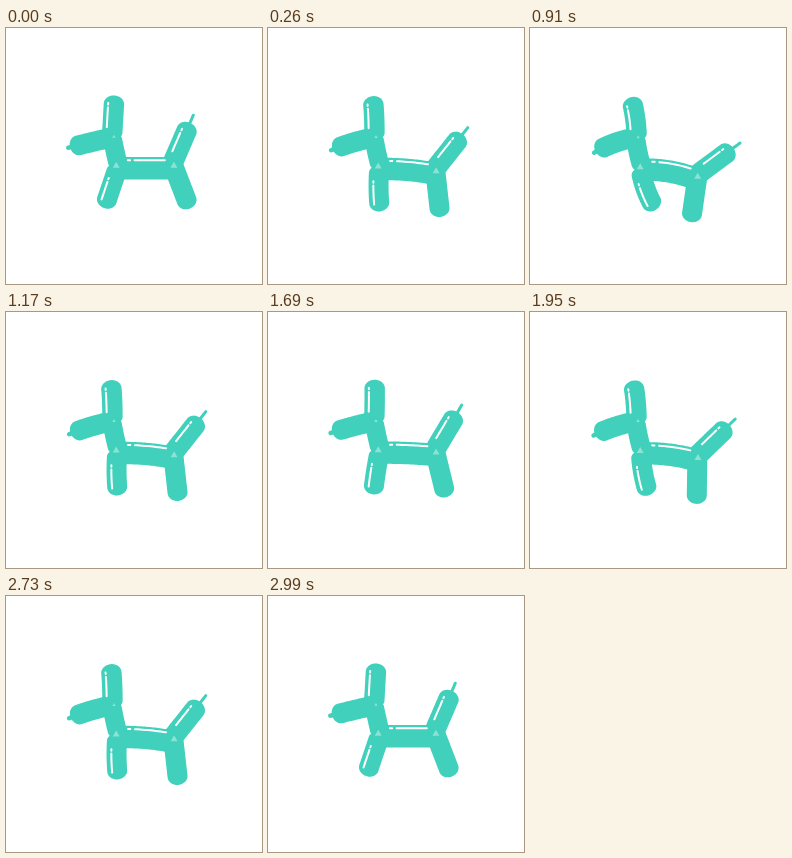
An HTML page with a canvas for the animation above (3120 ms loop, 256 px wide and 256 px high).

```html
<!DOCTYPE html>
<html lang="en">
<head>
<meta charset="utf-8">
<title>Balloon dog</title>
<style>
html, body { margin: 0; width: 100%; height: 100%; overflow: hidden; background: #fff; }
canvas { display: block; width: 256px; height: 256px; }
</style>
</head>
<body>
<canvas id="stage" width="256" height="256"></canvas>
<script>
const ctx = document.getElementById('stage').getContext('2d');
const TEAL = '#40d0bb', PALE = '#8ce3d5', STEP = 130, RAD = Math.PI / 180;

// Where the balloons are twisted together, and how far each twist drifts while bucking.
const joints = {
  head: { x: 106, y: 109.3, dx: 0.5, dy: 1.7 },
  shoulder: { x: 111.5, y: 140.3, dx: 0, dy: 3 },
  hip: { x: 166.5, y: 135.5, dx: 1.5, dy: 13.5 }
};

// A limb leaves its joint at `angle`, swings by `swing` and curls by `bend` degrees.
// `tuck` is the hidden part behind the joint; `shine` runs from a to b along the limb.
const limbs = {
  snout: { joint: 'head', angle: 166.6, swing: -5.6, bend: -30, reach: 43.2, tuck: 7, r: 10 },
  ear: { joint: 'head', angle: -86.7, swing: -13.8, bend: -20, reach: 41.9, tuck: 2, r: 10.2,
    shine: { side: 5.8, a: 0.82, b: 0.27 } },
  neck: { joint: 'head', angle: 77.5, swing: 0.5, bend: -18, reach: 33, tuck: 4, r: 9.5 },
  body: { joint: 'shoulder', angle: 0, swing: 12, bend: 34, reach: 60.3, tuck: 4.5, r: 11.2,
    shine: { side: 8, a: 0.23, b: 0.8 } },
  tail: { joint: 'hip', angle: -66.7, swing: 37.8, bend: 0, reach: 44.3, tuck: 4.5, r: 10.3,
    shine: { side: 5, a: 0.82, b: 0.32 } },
  hindLeg: { joint: 'hip', angle: 69, swing: 36.5, bend: 0, reach: 48.3, tuck: 1.5, r: 10 },
  frontLeg: { joint: 'shoulder', angle: 108.6, swing: -48.4, bend: -30, reach: 42, tuck: 3.5, r: 10,
    shine: { side: -5.2, a: 0.34, b: 0.84 } }
};

// Places a limb for buck amount k; returns its length and a point finder along its arc.
function pose(limb, k) {
  const { x, y, dx, dy } = joints[limb.joint];
  const angle = (limb.angle + limb.swing * k) * RAD, bend = limb.bend * k * RAD;
  const length = limb.reach + limb.tuck;
  const x0 = x + dx * k - limb.tuck * Math.cos(angle);
  const y0 = y + dy * k - limb.tuck * Math.sin(angle);
  const at = (s, side = 0) => {
    const half = bend * s / 2, chord = s * length * (half ? Math.sin(half) / half : 1);
    const toward = angle + half - bend / 2, heading = toward + half;
    return [x0 + chord * Math.cos(toward) + side * Math.sin(heading),
            y0 + chord * Math.sin(toward) - side * Math.cos(heading)];
  };
  return { length, at };
}

const cap = (d, size) => d < size ? Math.sqrt(1 - (1 - d / size) ** 2) : 1;

function fillShape(points, color) {
  ctx.fillStyle = color;
  ctx.beginPath();
  for (const p of points) ctx.lineTo(...p);
  ctx.fill();
}

function drawLimb({ length, at }, r) {
  const n = 60, left = [], right = [];
  for (let i = 0; i <= n; i++) {
    const s = (1 - Math.cos(Math.PI * i / n)) / 2;
    const w = r * cap(s * length, 7) * cap((1 - s) * length, 8.5);
    left.push(at(s, w));
    right.unshift(at(s, -w));
  }
  fillShape(left.concat(right), TEAL);
}

function drawLine({ at }, from, to, side, color, width) {
  ctx.strokeStyle = color;
  ctx.lineWidth = width;
  ctx.beginPath();
  for (let i = 0; i <= 12; i++) ctx.lineTo(...at(from + (to - from) * i / 12, side));
  ctx.stroke();
}

function drawShine(posed, { side, a, b }) {
  const span = b - a;
  drawLine(posed, a, a + span * 0.06, side, '#fff', 2);
  drawLine(posed, a + span * 0.18, b, side, '#fff', 2);
}

function drawKnot([x, y], r) {
  fillShape([-90, 30, 150].map(d => [x + r * Math.cos(d * RAD), y + r * Math.sin(d * RAD)]), PALE);
}

function draw(time) {
  const step = Math.floor(time / STEP) % 12;
  const k = Math.min(step, 11 - step) / 5;
  const posed = {};
  for (const name in limbs) posed[name] = pose(limbs[name], k);

  ctx.fillStyle = '#fff';
  ctx.fillRect(0, 0, 256, 256);
  ctx.lineCap = 'round';
  drawLine(posed.tail, 0.95, 1.17, 0, TEAL, 3);
  drawLine(posed.snout, 0.95, 1.035, 0, TEAL, 4.5);
  for (const name in limbs) drawLimb(posed[name], limbs[name].r);
  drawKnot(posed.body.at(0.05, 2.5), 4);
  drawKnot(posed.body.at(0.94, 2.5), 4);
  drawKnot(posed.snout.at(0.1), 2);
  for (const name in limbs) if (limbs[name].shine) drawShine(posed[name], limbs[name].shine);
}

const start = performance.now();
function loop() {
  draw(performance.now() - start);
  requestAnimationFrame(loop);
}
loop();
</script>
</body>
</html>
```
